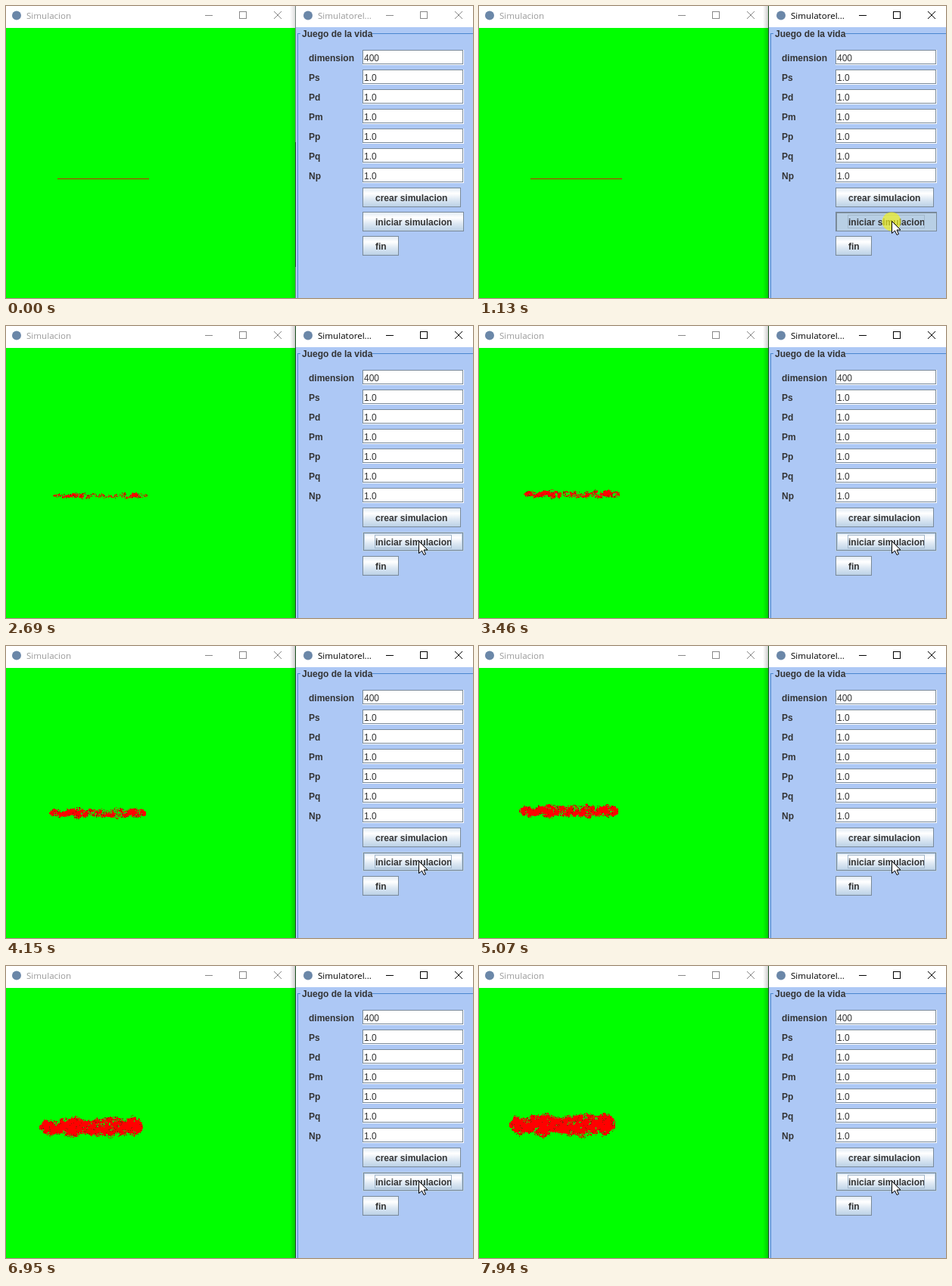
Write an HTML page with a canvas that moves like this. It is 617x386 px and loops after 8000 ms.

```html
<!DOCTYPE html>
<html lang="es">
<head>
<meta charset="utf-8">
<title>Simulacion</title>
<style>
html, body { margin: 0; width: 100%; height: 100%; overflow: hidden; }
canvas { display: block; }
</style>
</head>
<body>
<canvas id="stage" width="617" height="386"></canvas>
<script>
const ctx = document.getElementById('stage').getContext('2d');
const LOOP = 8000, PRESS = 1130, RELEASE = 1300, STEP = 77.2;
const SHADOW = '#7a8a99', CONTROL = '#b8cfe5', INK = '#333', GROUP = '#4a86cf';

const clamp = (v, lo, hi) => Math.min(hi, Math.max(lo, v));

function rect(color, x, y, w, h) {
  ctx.fillStyle = color;
  ctx.fillRect(x, y, w, h);
}

function frame(color, x, y, w, h) {
  ctx.strokeStyle = color;
  ctx.lineWidth = 1;
  ctx.strokeRect(x + 0.5, y + 0.5, w - 1, h - 1);
}

function text(str, x, y, color, font) {
  ctx.fillStyle = color;
  ctx.font = font;
  ctx.fillText(str, x, y);
}

const bold = (str, x, y) =>
  text(str, x, y, INK, 'bold 12px "Liberation Sans", Arial, sans-serif');

function titleBar(x, title, buttonsX, textColor, iconColor) {
  ctx.fillStyle = '#6b87a8';
  ctx.beginPath();
  ctx.arc(x + 8, 12.5, 6, 0, 7);
  ctx.fill();
  text(title, x + 21, 17, textColor, '11.6px "Open Sans", sans-serif');
  rect(iconColor, buttonsX, 12, 10, 1);
  frame(iconColor, buttonsX + 45, 7, 10, 10);
  ctx.strokeStyle = iconColor;
  ctx.beginPath();
  ctx.moveTo(buttonsX + 91, 7);
  ctx.lineTo(buttonsX + 101, 17);
  ctx.moveTo(buttonsX + 101, 7);
  ctx.lineTo(buttonsX + 91, 17);
  ctx.stroke();
}

function button(label, x, y, w, state) {
  const h = 26;
  if (state === 'pressed') {
    rect(CONTROL, x, y, w, h);
    rect(SHADOW, x, y, w, 2);
    rect(SHADOW, x, y, 2, h);
    rect(SHADOW, x + w - 1, y, 1, h);
    rect(SHADOW, x, y + h - 1, w, 1);
  } else {
    const fill = ctx.createLinearGradient(0, y, 0, y + h);
    fill.addColorStop(0, '#dde8f3');
    fill.addColorStop(0.3, '#fff');
    fill.addColorStop(0.6, '#dde8f3');
    fill.addColorStop(1, CONTROL);
    rect(fill, x, y, w, h);
    if (state === 'hover') {
      frame(CONTROL, x, y, w, h);
      frame(SHADOW, x + 1, y + 1, w - 2, h - 2);
      frame(CONTROL, x + 2, y + 2, w - 4, h - 4);
    } else {
      frame(SHADOW, x, y, w, h);
    }
  }
  bold(label, x + 17, y + 18);
}

function pointer(x, y) {
  const outline = [[0, 0], [0, 16], [4, 12.5], [6.5, 18], [9, 17], [6.5, 11.5], [11.5, 11.5]];
  ctx.beginPath();
  for (const [dx, dy] of outline) ctx.lineTo(x + dx, y + dy);
  ctx.closePath();
  ctx.fillStyle = '#fff';
  ctx.fill();
  ctx.strokeStyle = '#000';
  ctx.lineWidth = 1;
  ctx.stroke();
}

// Pointer rises from the bottom edge in discrete steps.
function pointerAt(t) {
  if (t < 130) return null;
  if (t >= 750) return [545, 284];
  const u = clamp((Math.floor((t - 130) / 78) + 1) / 7, 0, 1);
  const rest = (1 - u) ** 1.6;
  return [545 + 14 * rest, 285 + 112 * rest];
}

function hash(x, y, z) {
  let n = Math.imul(x, 374761393) ^ Math.imul(y, 668265263) ^ Math.imul(z, 1274126177);
  n = Math.imul(n ^ (n >>> 13), 1103515245);
  n = Math.imul(n ^ (n >>> 16), 2246822519);
  return ((n ^ (n >>> 15)) >>> 0) / 4294967296;
}

function smoothNoise(x, y) {
  const ix = Math.floor(x), iy = Math.floor(y);
  const fx = x - ix, fy = y - iy;
  const row = j => hash(ix, j, 7) * (1 - fx) + hash(ix + 1, j, 7) * fx;
  return row(iy) * (1 - fy) + row(iy + 1) * fy;
}

// Relative thickness of the colony from its left end to its right end.
const PROFILE = [0.2, 0.75, 0.85, 0.62, 0.75, 0.92, 1, 0.95, 0.72, 0.72, 0.8,
  0.88, 0.78, 0.88, 1.02, 1.05, 0.78, 0.85, 1, 0.85, 0.4];

function thickness(s) {
  const p = clamp((s + 1) * 10, 0, 19.999), i = Math.floor(p);
  return PROFILE[i] + (PROFILE[i + 1] - PROFILE[i]) * (p - i);
}

// A line of cells that drifts up and left while it spreads and fills in.
function colony(step) {
  if (step === 0) {
    rect('#c82800', 68, 228, 121, 1);
    return;
  }
  const cx = 128 - 0.21 * step, cy = 228 - 0.21 * step;
  const halfLength = 60 + 0.115 * step, halfHeight = 1.4 + 0.21 * step;
  const fill = 0.3 + 0.57 * (1 - Math.exp(-step / 35));
  for (let x = Math.ceil(cx - halfLength); x <= cx + halfLength; x++) {
    const gx = x - cx, reach = halfHeight * thickness(gx / halfLength);
    for (let y = Math.ceil(cy - reach); y <= cy + reach; y++) {
      const gy = y - cy, d = Math.abs(gy) / reach;
      const value = 0.62 * smoothNoise(gx / 4, gy / 4) + 0.38 * hash(x, y, step);
      const margin = fill * (1 - d ** 3) - value;
      if (margin <= 0) continue;
      const dark = margin < 0.12 && hash(x, y, step + 200) < 0.4;
      rect(dark ? '#8c2800' : '#f00', x, y, 1, 1);
    }
  }
}

function simulationWindow(t) {
  rect('#fff', 0, 0, 383, 29);
  rect('#0f0', 0, 29, 383, 357);
  titleBar(6, 'Simulacion', 263, '#999', '#888');
  colony(t < RELEASE ? 0 : 1 + Math.floor((t - RELEASE + 2) / STEP));
}

function controlWindow(t) {
  const active = t >= PRESS, cursor = pointerAt(t);
  const shade = ctx.createLinearGradient(375, 0, 383, 0);
  shade.addColorStop(0, 'rgba(0,0,0,0)');
  shade.addColorStop(1, active ? 'rgba(0,0,0,.22)' : 'rgba(0,0,0,.14)');
  rect(shade, 375, 0, 8, 386);
  rect(active ? '#174a1c' : '#70807a', 382, 0, 1, 386);
  if (!active) rect('#2c3c34', 382, 180, 1, 165);

  rect('#fff', 383, 0, 234, 28);
  rect('#adc8f5', 383, 28, 234, 358);
  titleBar(391, 'Simulatorel...', 502, active ? '#000' : '#999', active ? '#000' : '#888');

  rect(GROUP, 385, 36, 4, 1);
  rect(GROUP, 484, 36, 133, 1);
  rect(GROUP, 385, 36, 1, 350);
  bold('Juego de la vida', 391, 41);

  ['dimension', 'Ps', 'Pd', 'Pm', 'Pp', 'Pq', 'Np'].forEach((label, i) => {
    const y = 58 + 26 * i;
    bold(label, 400, y + 15);
    rect('#fff', 471, y, 134, 20);
    frame(SHADOW, 471, y, 133, 19);
    text(i ? '1.0' : '400', 473, y + 15, INK, '12px "Liberation Sans", Arial, sans-serif');
  });

  const pressed = active && t < RELEASE;
  const hover = cursor && cursor[1] < 298;
  button('crear simulacion', 471, 240, 130);
  button('iniciar simulacion', 471, 272, 134, pressed ? 'pressed' : hover ? 'hover' : '');
  if (active) frame('#a3b8cc', 487, 276, 102, 18);
  button('fin', 471, 304, 48);

  if (pressed) {
    ctx.fillStyle = 'rgba(240,240,30,.7)';
    ctx.beginPath();
    ctx.arc(545, 285, 12.5, 0, 7);
    ctx.fill();
  }
  if (cursor) pointer(cursor[0] + 0.5, cursor[1] + 0.5);
}

function draw() {
  const t = performance.now() % LOOP;
  simulationWindow(t);
  controlWindow(t);
  requestAnimationFrame(draw);
}
draw();
</script>
</body>
</html>
```
